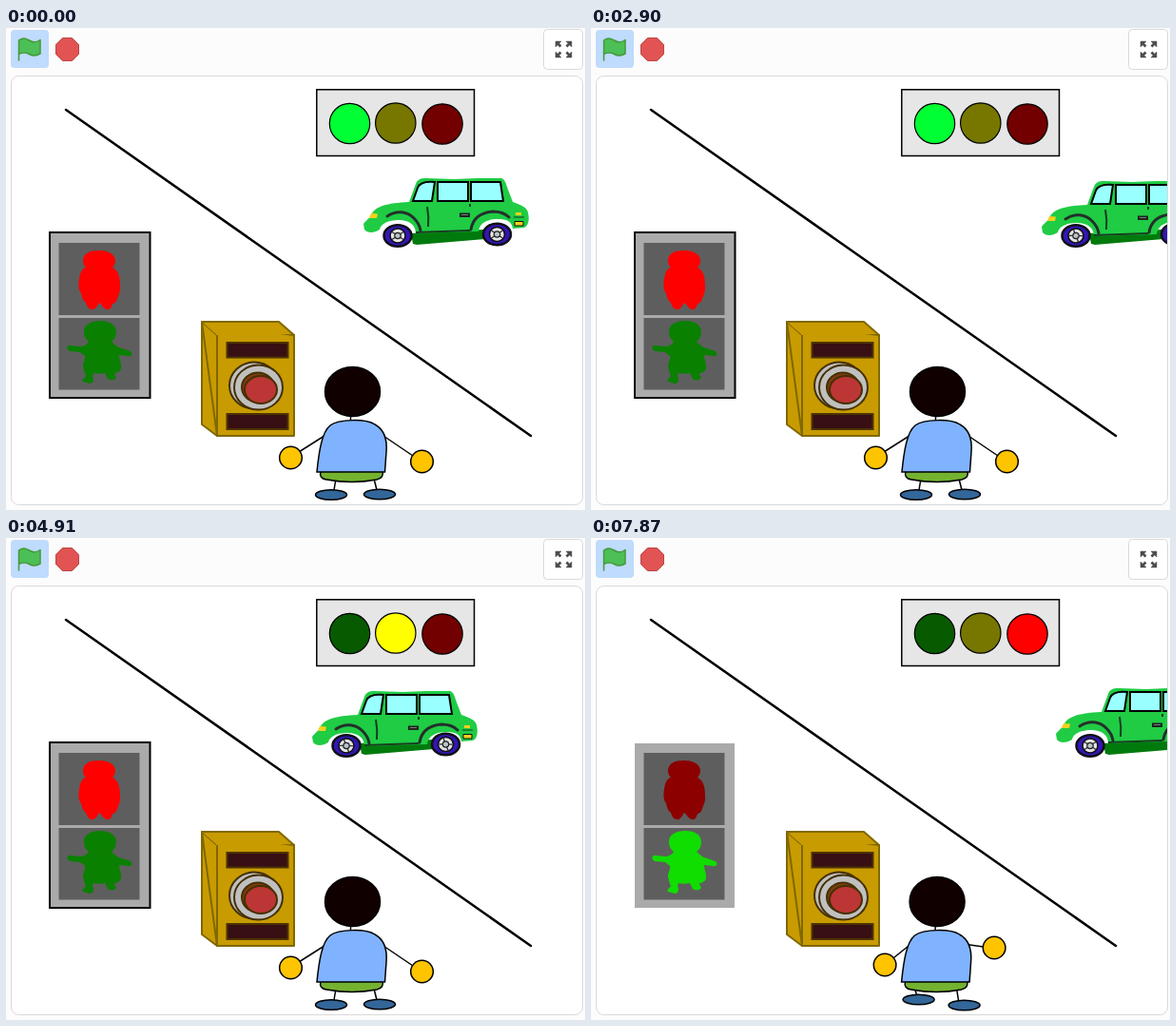
An HTML page for the animation above (8 s loop, 609 px wide and 507 px high).

```html
<!DOCTYPE html>
<html lang="en">
<head>
<meta charset="utf-8">
<title>Pedestrian crossing</title>
<style>
html, body { margin: 0; width: 100%; height: 100%; overflow: hidden; background: #fcfcfc; }
svg { display: block; width: 609px; height: 507px; }
.ink { stroke: #000; stroke-width: 1.5; }
.line { fill: none; stroke: #000; stroke-width: 1.5; }
.seam { fill: none; stroke: #173d20; stroke-width: 2; }
.arch { fill: none; stroke: #23302a; stroke-width: 3; stroke-linecap: round; }
.glass { fill: #99ffff; stroke: #000; stroke-width: 2; }
.lamp { fill: #f2d21c; }
.hand { fill: #ffc400; }
.shoe { fill: #336699; }
.bar { fill: #380f12; stroke: #4d3300; stroke-width: 2; }
.ring { fill: #c0c0c0; stroke: #453000; stroke-width: 2; }
</style>
</head>
<body>
<svg viewBox="0 0 609 507">
  <defs>
    <clipPath id="stageClip"><rect x="6" y="51" width="600" height="450" rx="7"/></clipPath>
    <g id="wheel">
      <ellipse rx="14.5" ry="11.3" fill="#3416b4" stroke="#101018" stroke-width="2.5"/>
      <ellipse rx="8" ry="7.5" fill="#e4e4e4" stroke="#101018" stroke-width="1.6"/>
      <path class="spokes" d="M-6-4L6 4M-6 4L6-4" stroke="#333" stroke-width="1.4"/>
      <circle r="3.2" fill="#b8c4c8" stroke="#222" stroke-width="1.2"/>
    </g>
  </defs>

  <!-- toolbar -->
  <rect x="5" y="2" width="40" height="40" rx="4" fill="#bfdbfd"/>
  <path d="M13.5 13C18 9.5 21 11 24.500 13S31 16 36 12.500V27C31 30 28 29.500 24.500 27.500S18 25 13.500 27.500Z" fill="#4cbf56"/>
  <path d="M13.500 34V13C18 9.500 21 11 24.500 13S31 16 36 12.500V27C31 30 28 29.500 24.500 27.500S18 25 13.500 27.500" fill="none" stroke="#45993d" stroke-width="1.500" stroke-linecap="round" stroke-linejoin="round"/>
  <path d="M59.500 10.500H69.500L76.500 17.500V27.500L69.500 34.500H59.500L52.500 27.500V17.500Z" fill="#e25353" stroke="#b84848" stroke-linejoin="round"/>
  <rect x="565.5" y="1.5" width="41" height="42" rx="4" fill="#fff" stroke="#d9d9d9"/>
  <g id="expand" fill="#4d4d4d" stroke="#4d4d4d"></g>

  <rect x="5.5" y="50.5" width="601" height="451" rx="8" fill="#fff" stroke="#d9d9d9"/>
  <g clip-path="url(#stageClip)">
    <path d="M63 86L552 429" stroke="#000" stroke-width="2.5" stroke-linecap="round"/>

    <!-- road signal -->
    <rect class="ink" x="326.8" y="64.8" width="165.7" height="69.7" fill="#e6e6e6"/>
    <g stroke="#000" stroke-width="1.2">
      <circle id="go" cx="361.5" cy="100.5" r="21.2"/>
      <circle id="wait" cx="409.8" cy="100" r="21.2"/>
      <circle id="stop" cx="459" cy="101" r="21.2"/>
    </g>

    <!-- walk signal -->
    <rect x="46" y="216" width="105" height="173" fill="#aaa"/>
    <rect id="frame" x="46" y="215" width="105.5" height="174" fill="none" stroke="#000" stroke-width="2"/>
    <path d="M55.500 226H140.500V302H55.500ZM55.500 305H140.500V380.500H55.500Z" fill="#5e5e5e"/>
    <path id="standMan" d="M81 245C81 237 88 234 98 234S115 238 115 245C115 248 113 251 112 252C118 255 120 261 120 271C121 277 118 281 117 285C116 289 113 290 112 290C111 294 109 297 106 296C102 295 101 291 98 289C96 292 94 297 90 296C86 295 85 292 84 289C81 287 80 284 79 279C76 276 76 269 77 264C78 257 80 253 84 252C82 250 81 248 81 245Z"/>
    <path id="walkMan" d="M82 319C82 312 89 308 99 308S116 312 116 320C116 324 114 328 111 330C114 332 116 335 119 336L131 340C134 343 132 346 128 345L119 344C119 349 122 354 121 358C120 363 115 362 114 364L116 368C114 371 109 371 107 369L104 363C100 364 96 364 92 363L91 366C93 369 92 374 88 374L81 372C79 370 83 368 84 366C82 363 82 359 81 356C81 352 84 348 83 345L78 341L67 340C63 338 64 333 68 334L79 335C83 334 85 333 87 330C83 327 82 323 82 319Z"/>

    <!-- push button -->
    <g stroke="#806800" stroke-width="2" fill="#c89b00" stroke-linejoin="round">
      <path d="M206 309H287L303 323H222V429L206 417Z"/>
      <path d="M206 309L222 323H303V429H222Z"/>
      <path d="M207 310L221 322V323H223V324H302" stroke="none"/>
    </g>
    <path d="M222 323V429" stroke="#806800" stroke-width="2"/>
    <rect class="bar" x="232.5" y="331" width="64" height="15.500"/>
    <rect class="bar" x="232.5" y="406" width="64" height="16"/>
    <ellipse class="ring" cx="261" cy="376" rx="26" ry="24.5"/>
    <ellipse class="ring" cx="265.500" cy="378" rx="25.500" ry="23.500"/>
    <ellipse cx="265" cy="378" rx="17" ry="15.500" fill="#7c3b12" stroke="#453000" stroke-width="2"/>
    <ellipse cx="268" cy="380.5" rx="17" ry="14.500" fill="#bd3636" stroke="#453000" stroke-width="2"/>

    <g id="car">
      <path d="M50 216L52 227L56 228L128 222L127 212Z" fill="#007a0c"/>
      <g id="shell">
        <path d="M0 206C3 202 8 199 9 195C13 188 24 184 48 183L55 164C57 159 60 158 66 158L95 159L120 158H145C149 159 150 164 152 170L157 183C165 186 172 188 173 194C175 202 173 209 169 210L157 211C156 203 150 201 141 201C130 201 122 205 121 214L55 216C55 207 48 202 37 202C26 202 18 206 17 212C11 216 4 216 1 212Z" fill="#1fcc44"/>
        <path class="glass" d="M52 182L57 168C59 163 64 161 75 162L72 182Z"/>
        <path class="glass" d="M78 162H110V182H78ZM113 162H144L147 182H113Z"/>
        <path class="arch" d="M25 198C35 191 46 193 53 200Q59 206 60 213"/>
        <path class="arch" d="M113 212C115 200 124 194 136 193Q147 193 153 199"/>
        <path class="seam" d="M67 188Q69 199 68 209M55 215L112 213M112 185V188"/>
        <rect x="101" y="194.500" width="11" height="4.500" fill="#222"/>
        <path d="M103 196.500H110" stroke="#687" />
        <path class="lamp" d="M8 195L15 195.500L14 200L6 200Z"/>
        <path class="lamp" d="M160 194H166V197H160Z"/>
        <path class="lamp" d="M159 203.500H168V208H159Z" stroke="#111"/>
        <path d="M158 199H169" stroke="#173d20" stroke-width="1.200"/>
      </g>
      <use href="#wheel" transform="translate(36 218.500)"/>
      <use href="#wheel" transform="translate(140.500 217)"/>
    </g>

    <g id="child">
      <path class="line" d="M362.500 405V414"/>
      <ellipse class="ink" cx="364.5" cy="382.5" rx="29" ry="26" fill="#100000"/>
      <g id="limbs"></g>
      <path class="ink" d="M331 466Q329 474 337 475Q364 480 390 475Q398 473 396 466Z" fill="#74b230"/>
      <path class="ink" d="M327 467C329 447 332 425 341 418C350 411 379 411 388 417C399 423 401 434 400 446L398.500 467Z" fill="#80b3ff"/>
    </g>
  </g>
</svg>
<script>
const LOOP = 8000, STEP = 77.7;
const PRESS = 900, RELEASE = 2840, AMBER = 3840, RED = 6840, WALK = 7870;
const BOUNCE = 555, BOUNCE_START = 7540;
const $ = id => document.getElementById(id);
const paint = (id, color) => $(id).setAttribute('fill', color);

$('expand').innerHTML = [0, 90, 180, 270].map(a =>
  `<g transform="translate(586.5 22.5) rotate(${a})"><path d="M3 3L7 7" stroke-width="2.6"/><path d="M8.500 2.500V8.500H2.500Z" stroke-width=".5"/></g>`).join('');

const limb = (x1, y1, x2, y2) => `<path class="line" d="M${x1} ${y1}L${x2} ${y2}"/>`;
const hand = (x, y) => `<circle class="ink hand" cx="${x}" cy="${y}" r="11.8"/>`;
const shoe = (x, y) => `<ellipse class="ink shoe" cx="${x}" cy="${y}" rx="16.5" ry="5.3"/>`;
const rightArm = limb(394, 427, 428, 450) + hand(437.5, 456);
const standing = limb(347, 474, 345, 486) + limb(387, 474, 390, 486) + shoe(342, 491) + shoe(393, 490.5);
const finger = '<path class="ink hand" d="M272 377C274 374 283 379 294 382C306 383 316 390 316 399C316 409 308 414 298 413C287 411 285 401 280 393C275 387 270 382 272 377Z"/>';
const poses = {
  rest: limb(338, 427, 308, 446) + hand(299.5, 452) + rightArm + standing,
  point: limb(337, 427, 311, 405) + finger + rightArm + standing,
  walk: limb(337, 427, 317, 443) + hand(309.5, 449) + limb(392, 427, 413, 430) + hand(424.5, 431)
    + limb(341, 474, 343, 481) + limb(385, 474, 387, 487) + shoe(345, 485.5) + shoe(393, 491.5)
};

// The car drives left in small steps and re-enters on the right twice.
function carX(t) {
  const k = Math.floor(t / STEP);
  if (k <= 26) return Math.floor(376 - 150 * k / 26);
  if (k <= 80) return Math.floor(416 - 170 * (k - 47) / 29);
  return Math.max(489, Math.floor(534 - 5.8 * (k - 81)));
}

let shownPose;
function render(t) {
  const amber = t >= AMBER && t < RED, walk = t >= WALK;
  paint('go', t < AMBER ? '#00ff33' : '#085a00');
  paint('wait', amber ? '#ffff00' : '#777700');
  paint('stop', t >= RED ? '#ff0000' : '#720000');
  paint('standMan', walk ? '#8c0000' : '#ff0000');
  paint('walkMan', walk ? '#10dd00' : '#0a8000');
  $('frame').style.display = walk ? 'none' : '';

  const low = Math.floor((t - BOUNCE_START) / BOUNCE) & 1;
  $('car').setAttribute('transform', `translate(${carX(t)} 0)`);
  $('shell').setAttribute('transform', `translate(0 ${low ? 3 : 0})`);
  document.querySelector('.spokes').setAttribute('transform', `rotate(${low ? 35 : 0})`);

  const pose = walk ? 'walk' : t >= PRESS && t < RELEASE ? 'point' : 'rest';
  if (pose !== shownPose) $('limbs').innerHTML = poses[shownPose = pose];
  $('child').setAttribute('transform', `translate(${pose === 'point' ? 0.6 : pose === 'walk' ? -0.4 : 0} 0)`);
}

const start = performance.now();
function tick() {
  render((performance.now() - start) % LOOP);
  requestAnimationFrame(tick);
}
tick();
</script>
</body>
</html>
```
